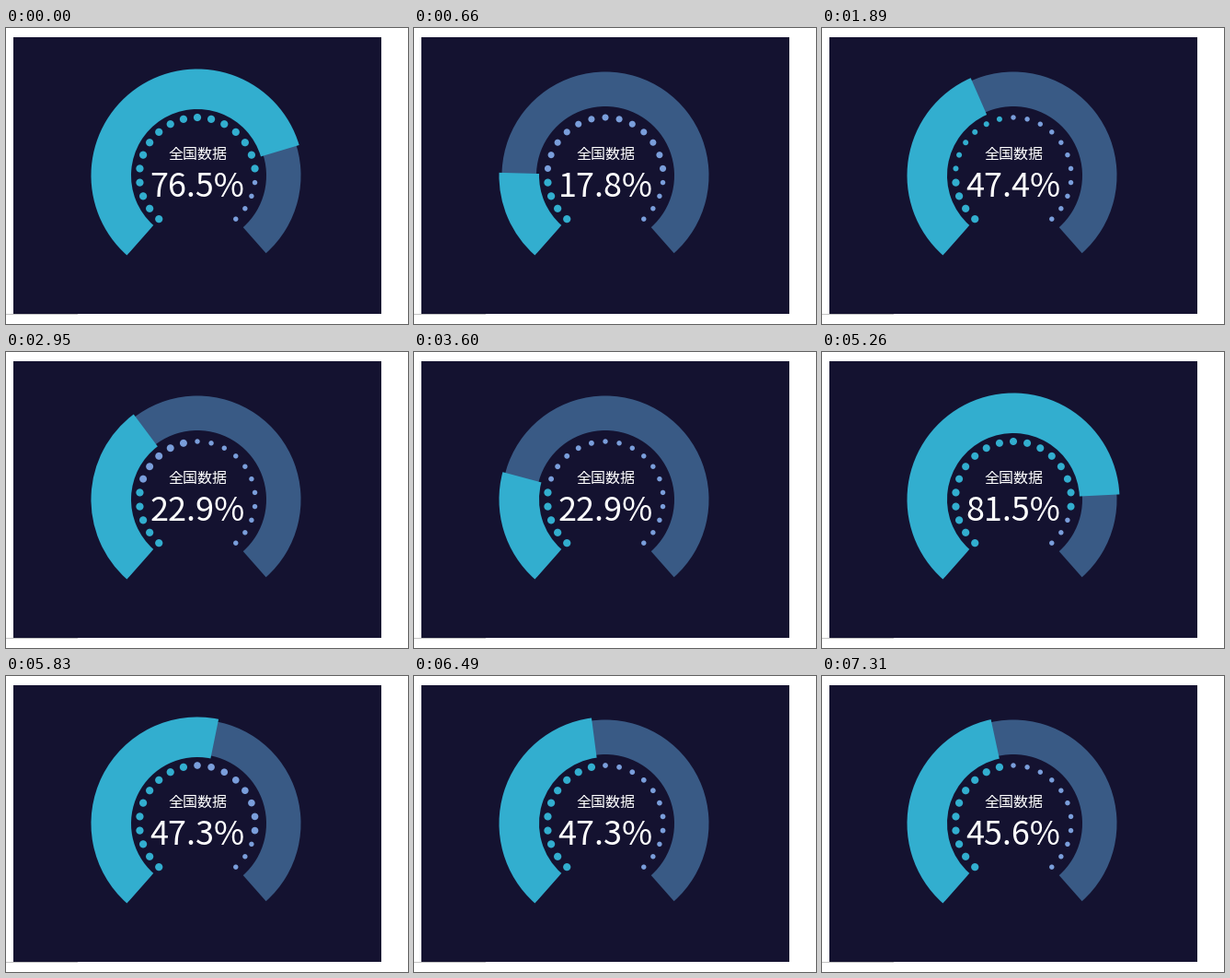
A matplotlib script for the animation above (8 s loop, 437 by 321 pixels).

```python
import numpy as np
import matplotlib.pyplot as plt
from matplotlib.animation import FuncAnimation
from matplotlib.patches import Circle, Rectangle, Wedge

W, H, DPI = 437, 321, 100
LOOP, STEP = 8000, 20

NAVY, TRACK, CYAN, LILAC = "#141230", "#395a85", "#32aecf", "#7a9edb"
CENTER = (208, 160)
HALF_SWEEP = 360 * 10 / 26
START = -90 - HALF_SWEEP          # y points down, so angles run clockwise
DOTS, DOT_RING = 21, 63
BIG, SMALL = 4.1, 2.7

# (time in ms, value in percent)
READINGS = [(-5000, 76.5), (450, 17.8), (1810, 47.4), (2950, 22.9),
            (4440, 81.5), (5750, 47.3), (7070, 45.6)]
LEAD, ARC_TIME, DOT_TIME = 58, 333, 1200

fig = plt.figure(figsize=(W / DPI, H / DPI), dpi=DPI, facecolor="white")
ax = fig.add_axes([0, 0, 1, 1])
ax.set_xlim(0, W)
ax.set_ylim(H, 0)
ax.axis("off")


def ease_out(elapsed, duration, power):
    u = min(max(elapsed / duration, 0), 1)
    return 1 - (1 - u) ** power


def mix(a, b, k):
    return a + (b - a) * k


def angle(value):
    return START + 2 * HALF_SWEEP * value / 100


def band(inner, outer, value, color):
    wedge = Wedge(CENTER, outer, START, angle(value), width=outer - inner,
                  facecolor=color, linewidth=0)
    return ax.add_patch(wedge)


def label(y, text, px):
    return ax.text(CENTER[0], y, text, color="white", fontsize=px * 72 / DPI,
                   family="Noto Sans CJK JP", ha="center", va="baseline")


ax.add_patch(Rectangle((8, 10), 400, 300, facecolor=NAVY, linewidth=0))
ax.add_patch(Rectangle((0, 310), 78, 1, facecolor="#c4c4c4", linewidth=0))
band(75, 112.5, 100, TRACK)
gauge = band(72, 115.5, 76.5, CYAN)

dots = []
for a in np.radians(np.linspace(START, START + 2 * HALF_SWEEP, DOTS)):
    spot = (CENTER[0] + DOT_RING * np.cos(a), CENTER[1] + DOT_RING * np.sin(a))
    dots.append(ax.add_patch(Circle(spot, SMALL, linewidth=0)))

label(142, "全国数据", 16)
number = label(183, "76.5%", 36)


def dot_size(index, value):
    return BIG if index < value / 100 * DOTS else SMALL


def update(frame):
    t = frame * STEP + STEP / 2
    now = max(i for i, (begin, _) in enumerate(READINGS) if begin <= t)
    begin, value = READINGS[now]
    before = READINGS[max(now - 1, 0)][1]
    elapsed = t - begin + LEAD

    number.set_text(f"{value:.1f}%")
    gauge.set_theta2(angle(mix(before, value, ease_out(elapsed, ARC_TIME, 3))))
    grow = ease_out(elapsed, DOT_TIME, 2)
    for i, dot in enumerate(dots):
        size = dot_size(i, value)
        dot.set_radius(mix(dot_size(i, before), size, grow))
        dot.set_facecolor(CYAN if size == BIG else LILAC)
    return [gauge, number, *dots]


anim = FuncAnimation(fig, update, frames=LOOP // STEP, interval=STEP,
                     repeat=True, repeat_delay=0)
plt.show()
```
